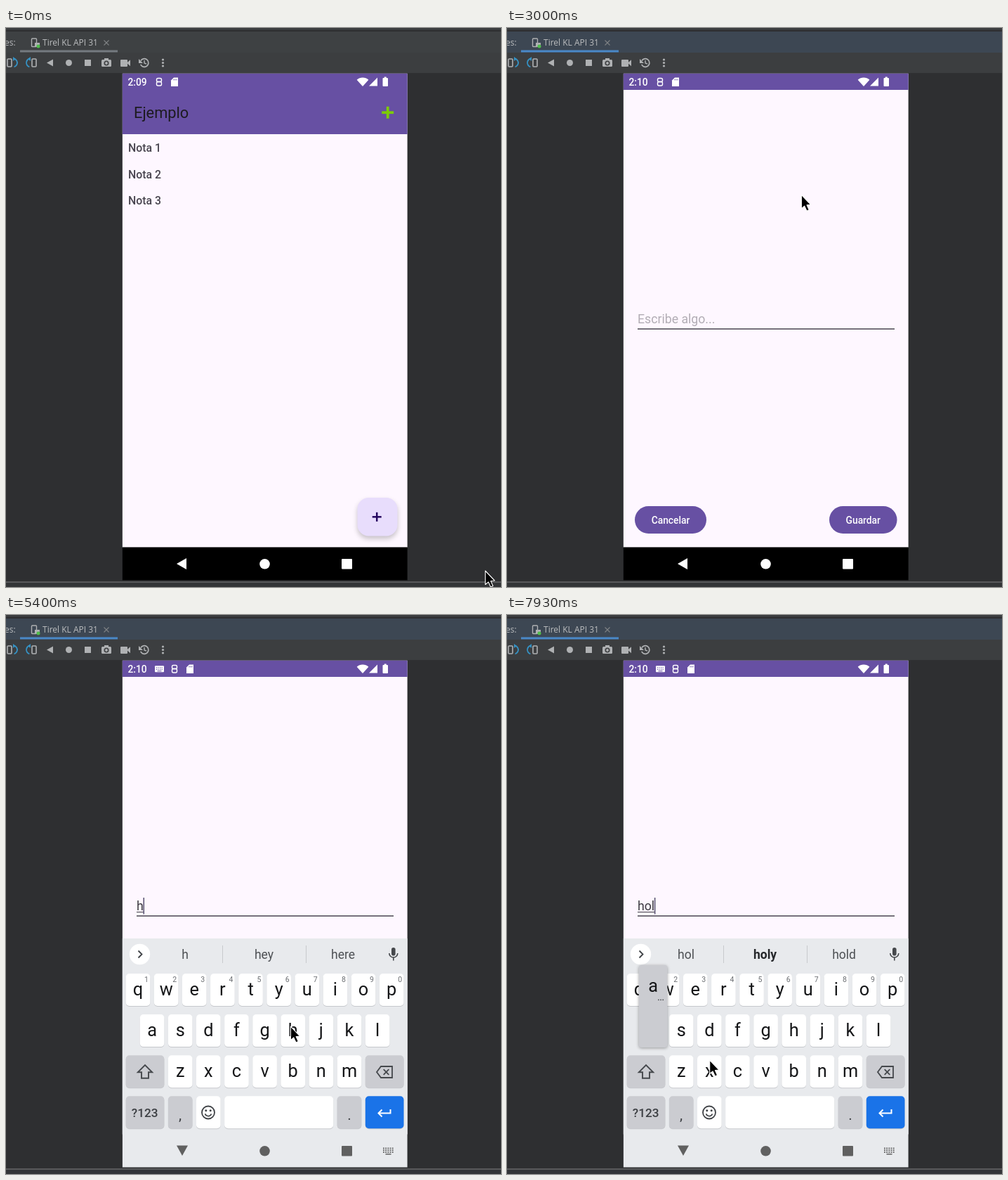
An HTML page with a canvas that plays this animation: 705x795 px, repeating every 8000 ms.

```html
<!DOCTYPE html>
<html lang="es">
<head>
<meta charset="utf-8">
<title>Notas</title>
<style>
html, body { margin: 0; width: 100%; height: 100%; overflow: hidden; background: #2e2f31; }
canvas { display: block; }
</style>
</head>
<body>
<canvas id="stage" width="705" height="795"></canvas>
<script>
const W = 705, H = 795, LOOP = 8000, RATE = 15;
const screenG = document.getElementById('stage').getContext('2d');
const layer = document.createElement('canvas');
layer.width = W;
layer.height = H;
const layerG = layer.getContext('2d');
let g = screenG;

const PURPLE = '#6750a3', PAPER = '#fef7ff', INK = '#49454f', RULE = '#55515b';
const TOOL = '#afb1b3', KEY = '#cbccd1', GLYPH = '#45484c';
const LEFT = 165.6, WIDE = 406.2, NAV = 738.6, FOOT = 785.6;
const clamp = v => Math.max(0, Math.min(1, v));
const mix = (a, b, p) => a + (b - a) * p;
const range = n => [...Array(n).keys()];

// Keyboard grid: each row with its shift in key widths.
const ROWS = [['qwertyuiop', 0], ['asdfghjkl', 0.5], ['zxcvbnm', 1.5]];
const PITCH = 40.13, ROW_H = 58.1;
const colX = col => 188 + col * PITCH;
const rowY = row => 533 + row * ROW_H;
function spot(char) {
  const row = ROWS.findIndex(([keys]) => keys.includes(char));
  return { row, x: colX(ROWS[row][1] + ROWS[row][0].indexOf(char)), y: rowY(row) };
}
const tip = char => [spot(char).x - 4, spot(char).y - 6];

// Times are ticks of 1/15 s.
const CLOCK = 11, ACTIVE = 34, OPEN = 38, FOCUS = 56, SHOW = 59, SHOW_LEN = 4.1, BREAK = 91;
const HOLD = 4, BLINK = 7;
const TAPS = [['h', 76], ['o', 90], ['l', 101], ['a', 116]];
const HINTS = { h: ['h', 'hey', 'here'], ho: ['ho', 'how', 'home'], hol: ['hol', 'holy', 'hold'] };
const REST = [682, 772];
const MOVES = [
  [1, 5, 525, 112], [17, 22, 437, 106], [23, 32, 537, 119], [40, 52, 253, 403],
  [60, 64, 592, 560], [64, 68, 436, 620], [69, 73, ...tip('h')], [85, 90, ...tip('o')],
  [94, 97, ...tip('l')], [102.7, 112, ...tip('a')], [118, 119, 288, 633]
];

function rect(x, y, w, h, color) {
  g.fillStyle = color;
  g.fillRect(x, y, w, h);
}
function round(x, y, w, h, r, color) {
  g.fillStyle = color;
  g.beginPath();
  g.roundRect(x, y, w, h, r);
  g.fill();
}
function frame(x, y, w, h, r, color, width) {
  g.beginPath();
  g.roundRect(x, y, w, h, r);
  g.strokeStyle = color;
  g.lineWidth = width;
  g.stroke();
}
function disc(x, y, r, color) {
  g.fillStyle = color;
  g.beginPath();
  g.arc(x, y, r, 0, 7);
  g.fill();
}
function arc(x, y, r, from, to, color, width) {
  g.beginPath();
  g.arc(x, y, r, from, to);
  g.strokeStyle = color;
  g.lineWidth = width;
  g.stroke();
}
function trace(pts) {
  g.beginPath();
  for (let i = 0; i < pts.length; i += 2) g.lineTo(pts[i], pts[i + 1]);
}
function poly(color, ...pts) {
  trace(pts);
  g.fillStyle = color;
  g.fill();
}
function line(color, width, ...pts) {
  trace(pts);
  g.strokeStyle = color;
  g.lineWidth = width;
  g.stroke();
}
const wedge = (x, y, w, h, color) => poly(color, x + w, y - h, x, y, x + w, y + h);
const chevron = (x, y, w, h, color, width) => line(color, width, x + w, y - h, x, y, x + w, y + h);
function cross(x, y, r, color, width) {
  line(color, width, x - r, y - r, x + r, y + r);
  line(color, width, x - r, y + r, x + r, y - r);
}
function plus(x, y, size, width, color) {
  rect(x - size / 2, y - width / 2, size, width, color);
  rect(x - width / 2, y - size / 2, width, size, color);
}
function dots(x, y, cols, rows, dx, dy, size, color) {
  for (const i of range(cols * rows)) {
    rect(x + (i % cols) * dx, y + Math.floor(i / cols) * dy, size, size, color);
  }
}
function text(str, x, y, size, color, align = 'left', weight = 400, family = 'Roboto') {
  g.font = `${weight} ${size}px "${family}", sans-serif`;
  g.textAlign = align;
  g.fillStyle = color;
  g.fillText(str, x, y);
  return g.measureText(str).width;
}
function shaded(blur, dy, color, draw) {
  g.save();
  g.shadowColor = color;
  g.shadowBlur = blur;
  g.shadowOffsetY = dy;
  draw();
  g.restore();
}

function rotateIcon(x, dir) {
  frame(x - dir * 4 - 3, 44, 6, 11, 1, TOOL, 1.6);
  const mid = dir > 0 ? 0 : Math.PI;
  arc(x + dir, 49.5, 6, mid - 1.3, mid + 1.3, '#3592c4', 1.8);
  wedge(x + dir * 5, 44, -dir * 4, 3, '#3592c4');
}
function ide(active) {
  rect(0, 0, W, H, '#2e2f31');
  rect(0, 0, W, 3, '#3b3d3f');
  rect(0, 5, W, 30, active ? '#3d4753' : '#3e4143');
  rect(0, 35, W, 29, '#3c3e40');
  rect(20, 31.5, 139, 3, active ? '#4a88c7' : '#747a80');
  text('es:', -2, 25, 12, '#bbbdbf', 'left', 400, 'Open Sans');
  text('Tirel KL API 31', 52, 25, 12, '#bbbdbf', 'left', 400, 'Open Sans');
  cross(143, 21, 3.5, '#7f8385', 1.1);
  frame(36.5, 15, 7, 11.5, 1, TOOL, 1.4);
  rect(41, 21, 7, 6, TOOL);
  disc(46, 26, 2.5, '#4fbd4b');

  rotateIcon(9, 1);
  rotateIcon(36, -1);
  wedge(58, 49.5, 9, 5, TOOL);
  disc(89.5, 49.5, 4.5, TOOL);
  rect(112, 45, 9, 9, TOOL);
  round(136, 45, 14, 10, 1.5, TOOL);
  rect(140, 43, 6, 3, TOOL);
  arc(143, 50, 2.7, 0, 7, '#3c3e40', 1.6);
  round(163, 45, 10, 10, 1, TOOL);
  wedge(172, 49.8, 5, 4.5, TOOL);
  arc(197, 49.5, 5.8, -2.6, 2.7, TOOL, 1.7);
  poly(TOOL, 189, 44, 189, 50, 195, 50);
  line(TOOL, 1.4, 197, 46, 197, 50, 200, 51);
  for (const i of range(3)) disc(223.5, 45 + i * 4.5, 1.6, TOOL);

  rect(0, 787, W, 2, '#58595b');
  rect(0, 789, W, 6, '#333537');
}

function status(clock, editing) {
  rect(LEFT, 64.5, WIDE, 23.5, PURPLE);
  text(clock, 173.5, 82, 13.8, '#fff', 'left', 500);
  const x = editing ? 240 : 218;
  if (editing) {
    round(212, 72.3, 13, 9, 1, '#fff');
    dots(214, 74.3, 4, 2, 2.5, 2.5, 1.2, PURPLE);
    rect(215.5, 79.2, 6, 1, PURPLE);
  }
  frame(x - 3.5, 71.5, 7, 5, 2, '#fff', 1.4);
  frame(x - 3.5, 76.5, 7, 5.5, 2, '#fff', 1.4);
  const s = x + 17;
  poly('#fff', s + 4, 70.5, s + 10, 70.5, s + 10, 83, s, 83, s, 74.5);
  dots(s + 3.3, 73, 3, 1, 2, 0, 1.2, PURPLE);
  g.fillStyle = '#fff';
  g.beginPath();
  g.moveTo(508, 83);
  g.arc(508, 83, 12.5, -2.3, -0.84);
  g.fill();
  poly('#fff', 517, 82.5, 529, 82.5, 529, 70.5);
  round(536.5, 71, 7.5, 12, 1, '#fff');
  rect(538.7, 69.5, 3, 2, '#fff');
}
function navIcons(color, down, keypad) {
  if (down) poly(color, 243, 754.5, 259, 754.5, 251, 769);
  else wedge(243, 762, 14, 8, color);
  disc(368.5, 762.3, 7.3, color);
  round(478, 755, 15, 14.5, 1, color);
  if (!keypad) return;
  dots(537, 757.5, 5, 3, 3.2, 2.8, 1.8, color);
  rect(540.5, 766, 8, 1.5, color);
}

function listScreen(clock) {
  rect(LEFT, 64.5, WIDE, NAV - 64.5, PAPER);
  status(clock, false);
  rect(LEFT, 88, WIDE, 63, PURPLE);
  text('Ejemplo', 182, 128, 21.8, '#1d1b20');
  plus(543.7, 120.2, 17, 3.8, '#7ccb05');
  for (const i of range(3)) text('Nota ' + (i + 1), 174, 176.3 + i * 37.2, 15.8, INK, 'left', 500);
  shaded(7, 4, 'rgba(0,0,0,.22)', () => round(500.5, 668, 57, 54.5, 16, '#e8ddfc'));
  plus(528.2, 695.3, 13, 2.5, '#25085f');
}
function button(x, w, label) {
  round(x, 680, w, 39, 19.5, PURPLE);
  text(label, x + w / 2, 704.8, 13.8, '#fff', 'center', 500);
}
function caretOn(k) {
  const edits = [FOCUS, ...TAPS.map(([, at]) => at + HOLD)];
  const last = edits.filter(at => at <= k).pop();
  return last !== undefined && Math.floor((k - last) / BLINK) % 2 === 0;
}
function editScreen(clock, k, word) {
  rect(LEFT, 64.5, WIDE, NAV - 64.5, PAPER);
  status(clock, k > FOCUS);
  const w = text(word, 186, 420, 17.7, '#3e3b43');
  rect(186, 422, w, 1, '#3e3b43');
  if (!word) text('Escribe algo...', 186, 420, 17.7, '#b2adb5');
  rect(186, 427.2, 366, 1.6, RULE);
  if (caretOn(k)) rect(185.7 + w, 402, 1.6, 23.5, '#5d5775');
  button(182, 102, 'Cancelar');
  button(459, 96.5, 'Guardar');
}

function keyCap(col, row, color, span = 1) {
  const w = span * PITCH - 5.5, x = colX(col) - w / 2, y = rowY(row) - 23;
  round(x, y + 1, w, 46, 5, '#c6c8cc');
  round(x, y, w, 46, 5, color);
}
function strip(word, ready) {
  disc(190.5, 482.5, 14.7, '#fff');
  chevron(193.5, 482.5, -5, 5, '#3f4246', 1.8);
  round(549, 473, 5.6, 11.5, 2.8, GLYPH);
  arc(551.8, 481, 6, 0, Math.PI, GLYPH, 1.6);
  rect(551, 487, 1.6, 4.5, GLYPH);
  if (word) {
    HINTS[word].forEach((hint, i) => {
      const bold = hint === 'holy';
      text(hint, 255 + i * 112.5, 489, 17.5, bold ? '#26282b' : '#4d5054', 'center', bold ? 700 : 400);
      if (i) rect(189 + i * 119, 470, 1, 25, '#c8cacd');
    });
  } else if (ready) {
    shaded(2, 1, 'rgba(0,0,0,.2)', () => round(257, 468, 151, 29, 14.5, '#fff'));
    frame(267, 475.5, 12, 14.5, 1, '#1a67d2', 1.7);
    rect(270, 473.5, 6, 4, '#1a67d2');
    for (const i of range(3)) rect(269.5, 479.5 + i * 3, 7, 1.3, '#1a67d2');
    text('https://gradle.o...', 287, 488, 14.05, '#26282b');
    round(417, 466.5, 65.5, 32, 16, '#f1f2f4');
    text('More', 428.8, 488, 13.6, '#3f4246');
    wedge(471, 482.5, -4, 3, '#aaadb1');
  }
}
function keyboard(word, ready) {
  rect(LEFT, 460, WIDE, 326, '#e8eaed');
  strip(word, ready);
  ROWS.forEach(([keys, shift], row) => [...keys].forEach((char, i) => {
    keyCap(shift + i, row, '#fff');
    const x = colX(shift + i);
    text(char, x, rowY(row) + 8.2, 25.3, '#151618', 'center');
    if (row === 0) text((i + 1) % 10, x + 12, 521.7, 10.5, '#6a6d71', 'center');
  }));

  for (const col of [0.25, 8.75]) keyCap(col, 2, KEY, 1.5);
  // Shift, backspace and enter signs.
  line(GLYPH, 1.9, 193, 658.7, 193, 650.3, 187.8, 650.3, 198, 640, 208.2, 650.3, 203, 650.3, 203, 658.7, 192, 658.7);
  line(GLYPH, 1.8, 534, 642, 550, 642, 550, 658, 534, 658, 528, 650, 534, 642, 535, 642);
  cross(541.5, 650, 3.8, GLYPH, 1.8);

  keyCap(0.25, 3, KEY, 1.5);
  keyCap(1.5, 3, KEY);
  keyCap(2.5, 3, '#fff');
  keyCap(5, 3, '#fff', 4);
  keyCap(7.5, 3, KEY);
  keyCap(8.75, 3, '#1a73e8', 1.5);
  text('?123', 197.7, 714, 17.2, '#3c3f43', 'center', 500);
  text(',', 248, 717.5, 21, '#3c3f43', 'center');
  text('.', 489, 718, 21, '#3c3f43', 'center');
  arc(288, 707.5, 9, 0, 7, '#3f4246', 1.8);
  for (const side of [-1, 1]) disc(288 + side * 3.2, 704.8, 1.5, '#3f4246');
  arc(288, 707.8, 4.8, 0.35, 2.8, '#3f4246', 1.7);
  line('#fff', 2, 547.5, 703, 547.5, 708.5, 530.5, 708.5);
  chevron(530.5, 708.5, 5, 5, '#fff', 2);
}
function popup(k) {
  const tap = TAPS.find(([, at]) => k >= at && k < at + HOLD);
  if (!tap) return;
  const { x, y } = spot(tap[0]);
  shaded(4, 1, 'rgba(0,0,0,.35)', () => round(x - 20.3, y - 93, 40.6, 117, 4, KEY));
  text(tap[0], x, y - 55.5, 25.3, '#151618', 'center');
  if (tap[0] === 'a') dots(x + 7, y - 44.5, 3, 1, 3.2, 0, 1.5, GLYPH);
}

// Columns of small squares alternate with columns of two-cell dashes.
function brokenFrame() {
  const cell = 4.5;
  rect(455, 64.5, 117, 23.5, PURPLE);
  rect(458, 88, 114, 553, '#fefbff');
  rect(455, 427.2, 97, 1.6, RULE);
  for (const c of range(26)) {
    const step = (c >> 1) % 2 * 2 + (c >> 2);
    for (const r of range(128)) {
      const on = c % 2 ? (r + step) % 4 < 2 : (r + step + 1) % 4 < 1;
      if (on) rect(455 + c * cell, 65 + r * cell, cell, cell, '#000');
    }
  }
  rect(LEFT, 641, WIDE, 145, '#000');
}

function pointer(k) {
  let [x, y] = REST;
  for (const [from, to, tx, ty] of MOVES) {
    const p = clamp((k - from) / (to - from));
    x = mix(x, tx, p);
    y = mix(y, ty, p);
  }
  g.save();
  g.translate(x, y);
  g.lineJoin = 'round';
  trace([0.7, 0, 0.7, 19.5, 5, 15.8, 8.3, 23, 11.6, 21.5, 8.4, 14.5, 14, 14]);
  g.closePath();
  g.fillStyle = '#000';
  g.fill();
  g.strokeStyle = '#fff';
  g.lineWidth = 1.1;
  g.stroke();
  g.restore();
}

function phone(k) {
  const clock = k < CLOCK ? '2:09' : '2:10';
  const word = TAPS.filter(([, at]) => k >= at + HOLD).map(([char]) => char).join('');
  const open = clamp((k - OPEN) / 5);
  const shown = clamp((k - SHOW) / SHOW_LEN);
  const rest = (1 - shown) ** 2;

  g.save();
  g.beginPath();
  g.rect(LEFT, 64.5, WIDE, FOOT - 64.5);
  g.clip();
  if (open < 1) listScreen(clock);
  if (open > 0) {
    g.save();
    g.globalAlpha = open;
    g.translate(0, 40 * (1 - open) ** 2);
    editScreen(clock, k, word);
    g.restore();
  }
  rect(LEFT, NAV, WIDE, FOOT - NAV, '#000');
  if (shown > 0) {
    // Drawn apart so the whole keyboard fades as one.
    g = layerG;
    g.clearRect(0, 0, W, H);
    keyboard(word, shown === 1);
    g = screenG;
    g.globalAlpha = (1 - rest) ** 1.25;
    g.drawImage(layer, 0, 326 * rest);
    g.globalAlpha = 1;
    popup(k);
  }
  const tone = Math.round(mix(255, 96, 1 - rest));
  navIcons(`rgb(${tone},${tone},${tone})`, shown > 0.5, k >= SHOW - 1);
  if (k >= BREAK && k < BREAK + 2) brokenFrame();
  g.restore();
}

function draw(now) {
  const k = Math.floor((now % LOOP) * RATE / 1000 + 0.06);
  ide(k >= ACTIVE);
  phone(k);
  pointer(k);
}
const start = performance.now();
function loop() {
  draw(performance.now() - start);
  requestAnimationFrame(loop);
}
loop();
</script>
</body>
</html>
```
